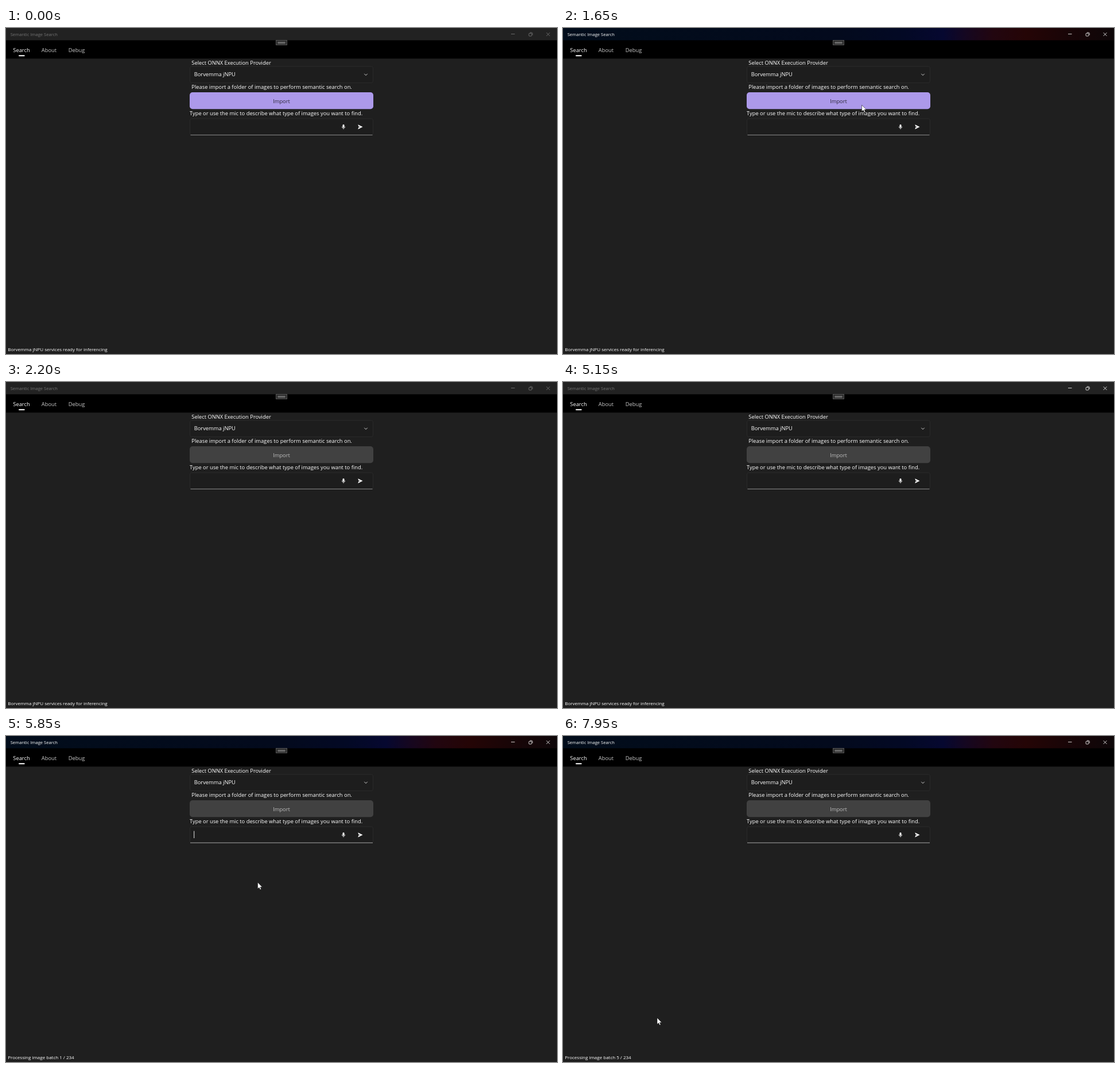
An HTML page that plays this animation: 960 px wide and 568 px high, repeating every 8000 ms.

```html
<!DOCTYPE html>
<html lang="en">
<head>
<meta charset="utf-8">
<title>Semantic Image Search</title>
<style>
  html, body { margin: 0; height: 100%; overflow: hidden; background: #1f1f1f; }
  svg { display: block; width: 960px; height: 568px; }
  text { font: 9.333px "Open Sans", "Noto Sans", sans-serif; fill: #fff; white-space: pre; }
  #title { font-size: 7.6px; }
  #status { font-size: 8px; }
  .mid { text-anchor: middle; }
  .tab { fill: #c8c8c8; }
  .field { fill: #1d1d1d; stroke: #2a2a2a; }
  .line { fill: none; stroke: #fff; stroke-width: .8; }
</style>
</head>
<body>
<svg viewBox="0 0 960 568">
  <defs>
    <linearGradient id="glow">
      <stop offset="0" stop-color="#020d1b"/>
      <stop offset=".5" stop-color="#030a1d"/>
      <stop offset=".62" stop-color="#030925"/>
      <stop offset=".69" stop-color="#060830"/>
      <stop offset=".73" stop-color="#150721"/>
      <stop offset=".78" stop-color="#220610"/>
      <stop offset=".84" stop-color="#250506"/>
      <stop offset=".92" stop-color="#180507"/>
      <stop offset="1" stop-color="#0e0709"/>
    </linearGradient>
  </defs>

  <rect width="960" height="568" fill="#1f1f1f"/>
  <rect width="960" height="22" fill="#222"/>
  <rect id="bar" width="960" height="22" fill="url(#glow)"/>
  <text id="title" x="7.7" y="14">Semantic Image Search</text>
  <g id="caption" class="line">
    <path d="M880 10.5h6.5M941.5 8l6 6m0-6l-6 6M912.8 8h2.7q1.8 0 1.8 1.8v2.7"/>
    <rect x="911" y="9.3" width="4.8" height="4.8" rx="1"/>
  </g>

  <rect y="21.4" width="960" height="31.9"/>
  <rect x="470.5" y="21.5" width="19" height="8" fill="#2a2a2a" stroke="#585858"/>
  <rect x="473.3" y="24" width="13.4" height="3.4" fill="#666"/>
  <text class="mid" x="27" y="41.6">Search</text>
  <text class="mid tab" x="75" y="41.6">About</text>
  <text class="mid tab" x="123" y="41.6">Debug</text>
  <rect x="22" y="47.2" width="10.7" height="2" rx="1" fill="#fff"/>

  <text x="323.3" y="63.6">Select ONNX Execution Provider</text>
  <rect class="field" x="320.5" y="67" width="319" height="28.5" rx="3"/>
  <text x="327.7" y="84.4">Borvemma jNPU</text>
  <path class="line" d="M624.3 79.8l2.7 2.7 2.7-2.7"/>

  <text x="323.3" y="106">Please import a folder of images to perform semantic search on.</text>
  <rect id="button" x="320" y="112" width="320" height="29.3" rx="5"/>
  <text id="label" class="mid" x="480" y="130.8">Import</text>

  <text x="320" y="151.6">Type or use the mic to describe what type of images you want to find.</text>
  <rect class="field" x="320.5" y="158" width="319" height="28.5" rx="3"/>
  <path d="M321.5 186.4h317" stroke="#8c8c8c"/>
  <path id="focus" d="M321 186.1h318" stroke="#6c6c6c" stroke-width="1.6"/>
  <path id="caret" d="M327.7 165.5v12.5" stroke="#fff" stroke-width=".9"/>
  <rect x="586.5" y="168" width="3" height="5.5" rx="1.5" fill="#fff"/>
  <path class="line" d="M585.3 171.8a2.7 2.7 0 0 0 5.4 0M588 174.5v2"/>
  <path d="M613.2 168.2l8.3 4.1-8.3 4.1 1.2-3.5 3.6-.6-3.6-.6z" fill="#fff"/>

  <text id="status" x="3.3" y="562.5"></text>
  <path id="cursor" d="M0 0V11.3L2.6 8.9 4.3 12.8 6.2 12 4.5 8.2H8Z" fill="#fff" stroke="#000" stroke-width=".5"/>
</svg>

<script>
const LOOP = 8000, STEP = 50;
const el = id => document.getElementById(id);
const ramp = (t, from, to) => Math.min(1, Math.max(0, (t - from) / (to - from)));
const smooth = u => u * u * (3 - 2 * u);
const within = (t, ...spans) => spans.some(([from, to]) => t >= from && t < to);
const show = (id, on) => el(id).setAttribute("visibility", on ? "visible" : "hidden");
const fill = (id, color) => el(id).style.fill = color;
const mix = (a, b, u) => `rgb(${a.map((v, i) => Math.round(v + (b[i] - v) * u))})`;

// Pointer moves: start, end, from point, to point
const moves = [
  [1100, 1700, [748, 91], [516, 135]],
  [5250, 5800, [520, 292], [438.5, 255]],
  [7350, 7900, [438.5, 255], [164, 491]]
];

function draw(t) {
  const active = within(t, [1100, 2050], [5200, LOOP]);
  const glow = t < 3000
    ? ramp(t, 1050, 1200) - ramp(t, 2000, 2150)
    : ramp(t, 5150, 5350);
  el("bar").setAttribute("opacity", glow);
  fill("title", active ? "#fff" : "#747474");
  el("caption").style.stroke = within(t, [1050, 2200], [5150, LOOP]) ? "#fff" : "#7c7c7c";

  fill("button", mix([172, 153, 234], [65, 65, 65], ramp(t, 1770, 1870)));
  fill("label", mix([44, 40, 56], [190, 190, 190], ramp(t, 1770, 1850)));

  show("focus", within(t, [1800, 2100], [5250, LOOP]));
  show("caret", within(t, [1800, 2100], [5300, 6850], [7350, 7850]));

  const batch = 1 + Math.floor((t - 5450) / 550);
  el("status").textContent = batch < 1
    ? "Borvemma jNPU services ready for inferencing"
    : `Processing image batch ${batch} / 234`;

  show("cursor", within(t, [1100, 2050], [5250, LOOP]));
  const [start, end, a, b] = moves.findLast(m => t >= m[0]) || moves[0];
  const u = smooth(ramp(t, start, end));
  el("cursor").setAttribute("transform",
    `translate(${a[0] + (b[0] - a[0]) * u} ${a[1] + (b[1] - a[1]) * u})`);
}

function tick() {
  draw(Math.floor(performance.now() % LOOP / STEP) * STEP);
  requestAnimationFrame(tick);
}
tick();
</script>
</body>
</html>
```
